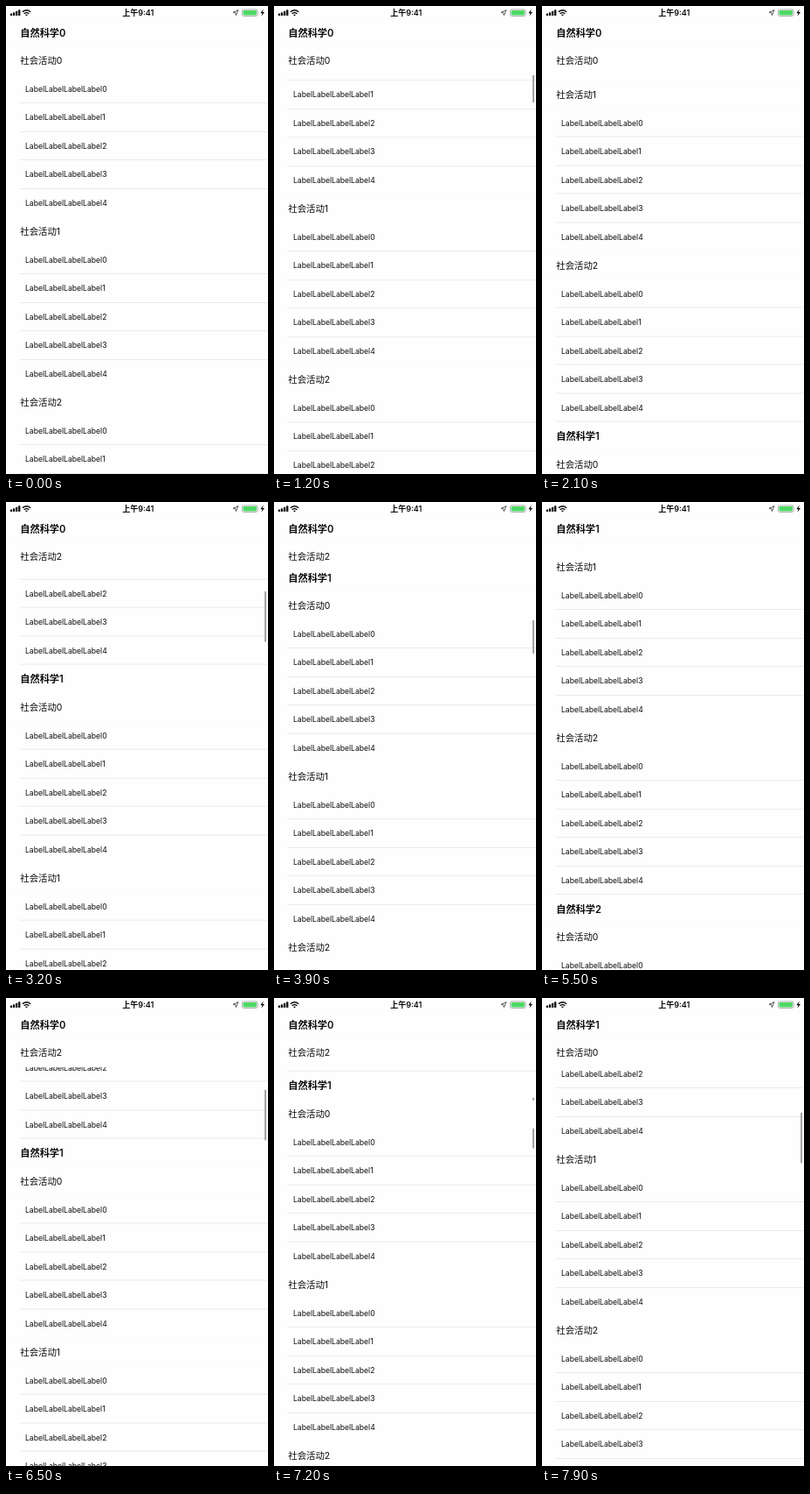
An HTML page that plays this animation: 300 px wide and 534 px high, repeating every 8000 ms.

```html
<!DOCTYPE html>
<html lang="zh">
<head>
<meta charset="utf-8">
<title>Nested sticky list</title>
<style>
  html, body { margin: 0; width: 100%; height: 100%; overflow: hidden; background: #fefefe; }
  #stage {
    position: relative; width: 300px; height: 534px; overflow: hidden;
    color: #0a0a0a; background: #fefefe; white-space: nowrap;
    font-family: Inter, "Noto Sans CJK SC", "Noto Sans CJK", sans-serif;
  }
  #stage div { position: absolute; box-sizing: border-box; }
  #list { left: 0; top: 46.5px; width: 300px; bottom: 0; overflow: hidden; }
  #titles { left: 0; top: 10px; width: 300px; bottom: 0; overflow: hidden; }
  #rows { left: 0; top: 0; width: 300px; }
  .row { left: 15px; width: 285px; height: 32.6px; padding-left: 7px; font-size: 8.6px; line-height: 33.6px; }
  .row.line::after {
    content: ""; position: absolute; left: 0; right: 0; bottom: 0; height: 1px; background: #ebebeb;
  }
  .head { left: 0; top: 0; width: 300px; height: 32px; padding-left: 16.3px; line-height: 32px; background: #fefefe; }
  .sub { font-size: 10.4px; line-height: 32.6px; z-index: 1; }
  .sub.first { z-index: 3; }
  .title { font-size: 11.2px; font-weight: 600; }
  #bar { left: 295.8px; top: 0; width: 1.8px; height: 58px; border-radius: 1px; background: #a2a2a2; z-index: 2; }
  #clock { left: 0; top: 0; width: 302.6px; height: 16px; line-height: 16px; text-align: center; font-size: 9px; font-weight: 600; }
  #icons { position: absolute; left: 0; top: 0; }
</style>
</head>
<body>
<div id="stage">
  <div id="list"><div id="rows"></div><div id="bar"></div></div>
  <div id="titles"></div>
  <div id="clock">上午9:41</div>
  <svg id="icons" width="300" height="16" fill="#111">
    <rect x="4.8" y="8.4" width="2.3" height="2.6" rx=".5"/>
    <rect x="7.9" y="7.2" width="2.3" height="3.8" rx=".5"/>
    <rect x="11" y="5.8" width="2.3" height="5.2" rx=".5"/>
    <rect x="14.1" y="4.2" width="2.3" height="6.8" rx=".5"/>
    <g fill="none" stroke="#111" stroke-width="1.5">
      <path d="M18.8 6.8Q23.5 2.6 28.2 6.8"/>
      <path d="M20.6 8.8Q23.5 6.2 26.4 8.8"/>
    </g>
    <path d="M22 10.1Q23.5 8.9 25 10.1L23.5 11.6Z"/>
    <path d="M266 4.6L263.3 10.6L262.8 7.8L260 7.3Z" fill="none" stroke="#333" stroke-width=".8" stroke-linejoin="round"/>
    <rect x="270.4" y="3.9" width="17.6" height="7.6" rx="2" fill="none" stroke="#999" stroke-width=".8"/>
    <rect x="271.5" y="5" width="15.4" height="5.4" rx="1.1" fill="#4cd964"/>
    <path d="M288.9 6.3Q290 7.7 288.9 9.1Z" fill="#999"/>
    <path d="M294.6 3.8L291.4 8.2H293.4L292.6 11.6L296 7H294Z"/>
  </svg>
</div>
<script>
const LOOP = 8000, STEP = 100;
const HEAD = 32, ROW = 32.6, GROUP = HEAD + 5 * ROW, SECTION = HEAD + 3 * GROUP;
const TITLE_TOP = 14.5, SUB_TOP = TITLE_TOP + HEAD, TITLE_CLIP = 10;

// [ms, scroll offset]
const scroll = [
  [700, 0], [1000, -14], [1600, 148], [1900, 156.5], [2200, 156.5],
  [2700, 602], [3200, 445.4], [3900, 561], [4000, 576], [4100, 592],
  [4900, 784], [5200, 800], [5600, 800], [6500, 470.5], [7400, 580], [7900, 690]
];
// [ms, scroll bar opacity]
const barFade = [
  [700, 0], [800, 1], [1800, 1], [2100, 0], [2200, 0], [2300, 1],
  [5200, 1], [5500, 0], [5600, 0], [5700, 1]
];

const byId = id => document.getElementById(id);
const slope = (keys, i) => keys[i] && keys[i + 1]
  ? (keys[i + 1][1] - keys[i][1]) / (keys[i + 1][0] - keys[i][0]) : 0;

// Tangent that never overshoots a key.
function tangent(keys, i) {
  const a = slope(keys, i - 1), b = slope(keys, i);
  return a * b > 0 ? 2 * a * b / (a + b) : 0;
}

function sample(keys, t) {
  if (t <= keys[0][0]) return keys[0][1];
  const i = keys.findIndex(k => k[0] > t) - 1;
  if (i < 0) return keys[keys.length - 1][1];
  const [t0, v0] = keys[i], [t1, v1] = keys[i + 1];
  const d = t1 - t0, u = (t - t0) / d, w = 1 - u;
  return v0 * w * w * (1 + 2 * u) + v1 * u * u * (3 - 2 * u)
    + d * u * w * (w * tangent(keys, i) - u * tangent(keys, i + 1));
}

function add(parent, className, text) {
  const el = document.createElement("div");
  el.className = className;
  el.textContent = text;
  byId(parent).appendChild(el);
  return el;
}

const titles = [], subs = [];
for (let s = 0; s < 3; s++) {
  const top = TITLE_TOP + s * SECTION;
  titles.push({ top, el: add("titles", "head title", "自然科学" + s) });
  for (let g = 0; g < 3; g++) {
    const groupTop = top + HEAD + g * GROUP;
    subs.push({ top: groupTop, el: add("list", "head sub" + (g ? "" : " first"), "社会活动" + g) });
    for (let r = 0; r < 5; r++) {
      const line = r < 4 || g === 2 ? " line" : "";
      const row = add("rows", "row" + line, "LabelLabelLabelLabel" + r);
      row.style.top = groupTop + HEAD + r * ROW - SUB_TOP + "px";
    }
  }
}

const moveY = (el, y) => { el.style.transform = `translateY(${y}px)`; };

// Headers stick at a line until the next one pushes them away.
function stick(heads, line, origin, offset) {
  heads.forEach(({ top, el }, i) => {
    const next = heads[i + 1] ? heads[i + 1].top - offset - HEAD : Infinity;
    moveY(el, Math.min(Math.max(line, top - offset), next) - origin);
  });
}

function draw(now) {
  const t = Math.floor(now % LOOP / STEP) * STEP;
  const offset = sample(scroll, t);
  moveY(byId("rows"), -offset);
  stick(subs, SUB_TOP, SUB_TOP, offset);
  stick(titles, TITLE_TOP, TITLE_CLIP, offset);
  moveY(byId("bar"), 2.1 + 0.118 * Math.max(offset, 0));
  byId("bar").style.opacity = sample(barFade, t);
}

const start = performance.now();
function tick() {
  draw(performance.now() - start);
  requestAnimationFrame(tick);
}
tick();
</script>
</body>
</html>
```
